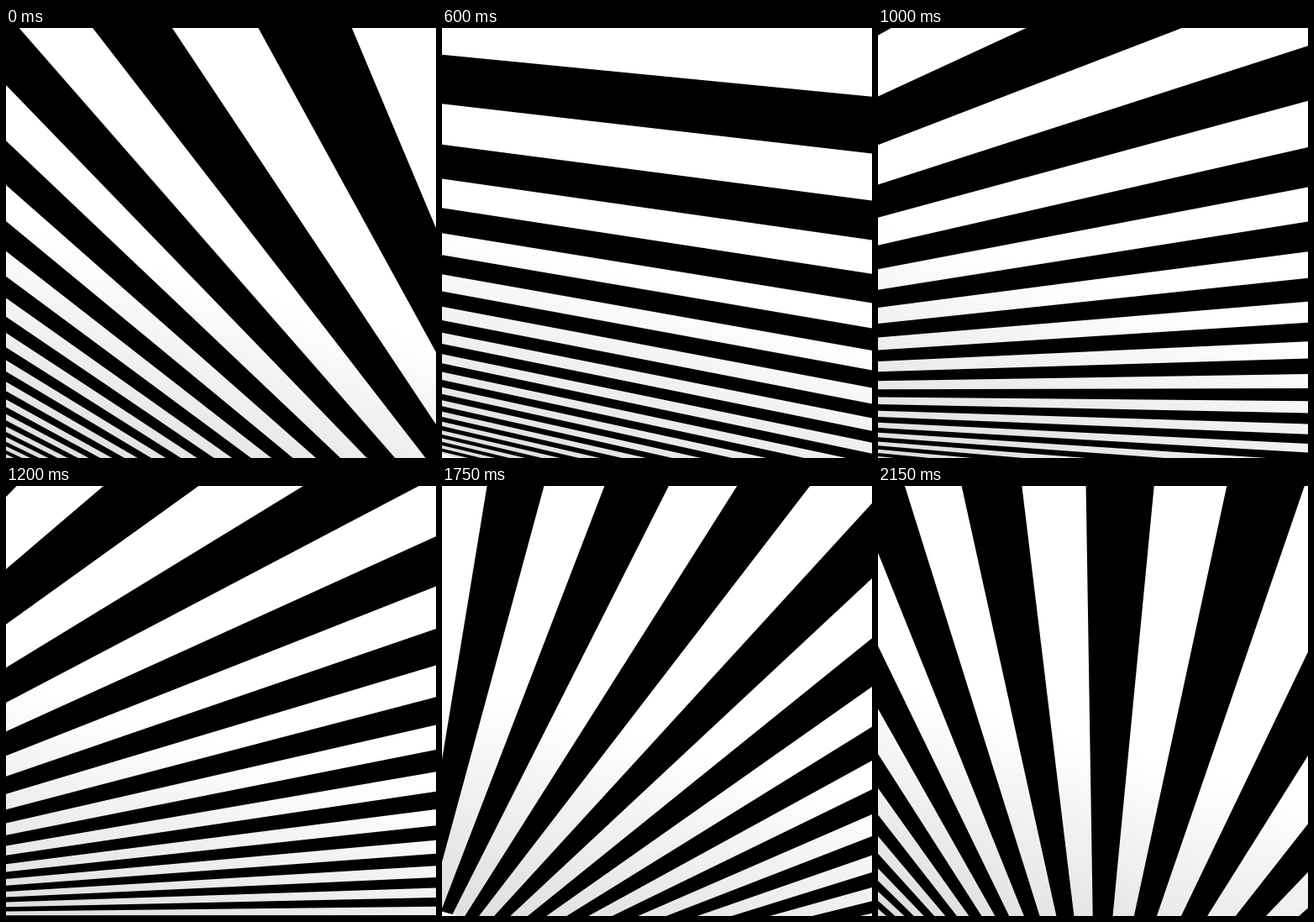
Animation of 512x512 px, one loop 2200 ms. Source, as an HTML page with a canvas:

```html
<!DOCTYPE html>
<html lang="en">
<head>
<meta charset="utf-8">
<title>Rotating striped plane</title>
<style>
  html, body { margin: 0; width: 100%; height: 100%; overflow: hidden; background: #fff; }
  canvas { display: block; width: 512px; height: 512px; }
</style>
</head>
<body>
<canvas id="stage" width="512" height="512"></canvas>
<script>
const ctx = document.getElementById('stage').getContext('2d');
const SIZE = 512, LOOP = 2200, STEP = 50;
const RAD = Math.PI / 180;

// Perspective: horizon line y = HORIZON + TILT * x, seen from focal length FOCAL.
const HORIZON = 650, TILT = 0.286, ORIGIN = -64.5, FOCAL = 556;

// Square plane turning about its pivot, with evenly spaced stripes.
const PIVOT = { x: 0.4263, z: 2.215 };
const HALF = 1.66, PERIOD = 0.1894, OFFSET = 0.0217, REACH = 9;

// The turn runs at 30 poses per second, shown at 20 pictures per second.
const START = -33.4, TURN = 2.4, POSES = 1.5;

const depth = (x, y) => HORIZON + TILT * x - y;

// Keeps the part of a polygon where side(x, y) >= 0.
function clip(poly, side) {
  const out = [];
  poly.forEach((p, i) => {
    const q = poly[(i + 1) % poly.length];
    const a = side(...p), b = side(...q);
    if (a >= 0) out.push(p);
    if ((a >= 0) !== (b >= 0)) {
      const k = a / (a - b);
      out.push([p[0] + (q[0] - p[0]) * k, p[1] + (q[1] - p[1]) * k]);
    }
  });
  return out;
}

// Part of a polygon between two parallel lines of the plane.
function band(poly, axis, lo, hi) {
  const above = clip(poly, (x, y) => axis(x) - lo * depth(x, y));
  return clip(above, (x, y) => hi * depth(x, y) - axis(x));
}

function fill(poly, paint) {
  if (poly.length < 3) return;
  ctx.fillStyle = paint;
  ctx.beginPath();
  poly.forEach(p => ctx.lineTo(...p));
  ctx.closePath();
  ctx.fill();
}

// The plane darkens towards the horizon.
const shade = ctx.createLinearGradient(0, 512, 74, 251);
shade.addColorStop(0, 'rgb(221,221,221)');
shade.addColorStop(1, 'rgb(255,255,255)');

function draw(pose) {
  const angle = (START + TURN * pose) * RAD;
  const sin = Math.sin(angle), cos = Math.cos(angle);
  const across = x => sin * (x - ORIGIN) + cos * FOCAL;
  const along = x => cos * (x - ORIGIN) - sin * FOCAL;
  const mid = PIVOT.x * sin + PIVOT.z * cos;
  const side = PIVOT.x * cos - PIVOT.z * sin;

  ctx.fillStyle = '#fff';
  ctx.fillRect(0, 0, SIZE, SIZE);

  const stage = [[0, 0], [SIZE, 0], [SIZE, SIZE], [0, SIZE]];
  const strip = band(stage, along, side - HALF, side + HALF);
  const plane = band(strip, across, mid - HALF, mid + HALF);
  fill(plane, shade);
  for (let k = -REACH; k <= REACH; k++) {
    const center = mid + OFFSET + k * PERIOD;
    fill(band(plane, across, center - PERIOD / 4, center + PERIOD / 4), '#000');
  }
}

const begin = performance.now();
function tick() {
  const time = Math.max(0, performance.now() - begin) % LOOP;
  draw(Math.floor(Math.floor(time / STEP) * POSES));
  requestAnimationFrame(tick);
}
tick();
</script>
</body>
</html>
```
